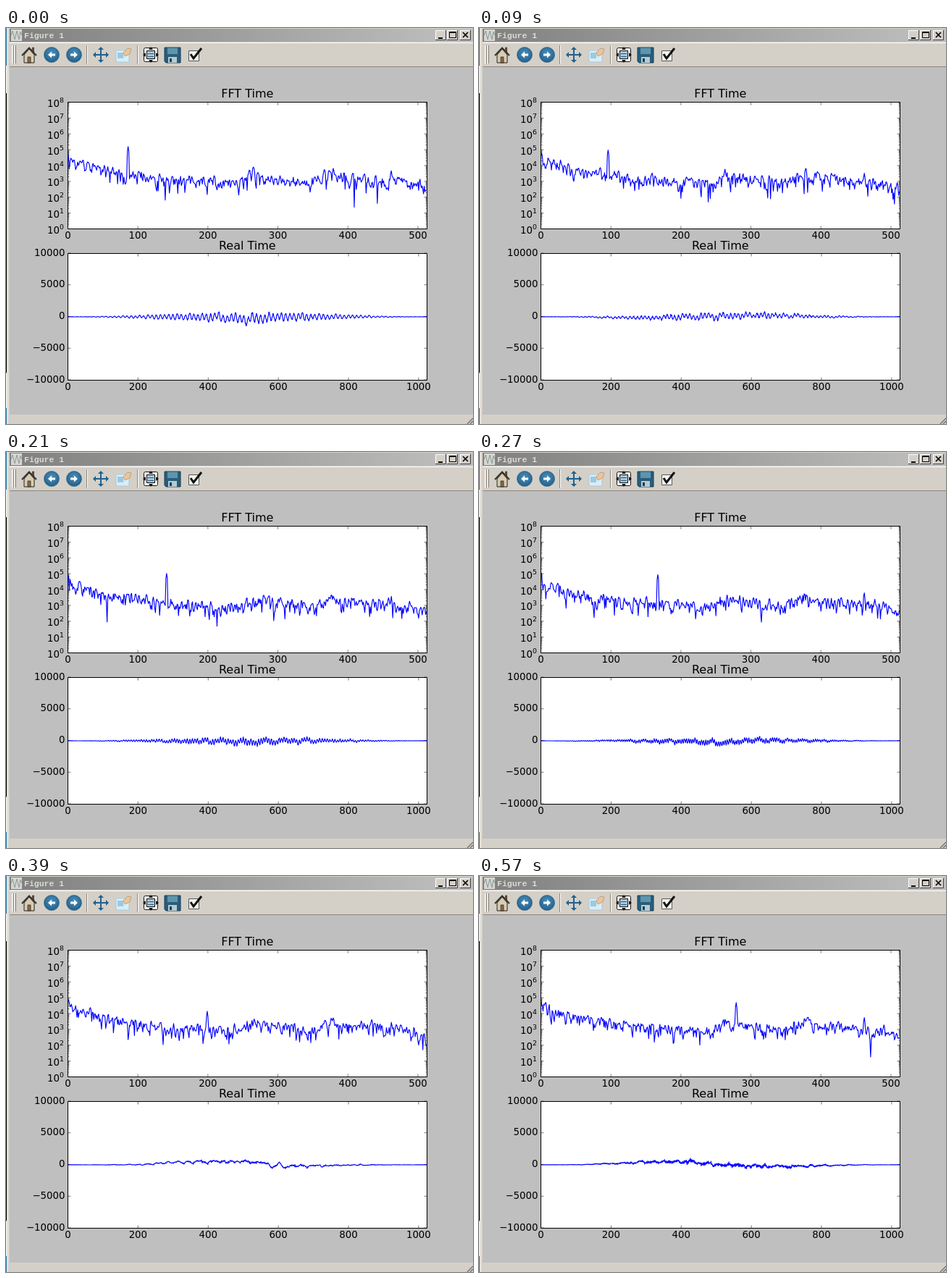
An HTML page that plays this animation: 645x547 px, repeating every 0.6 s.

```html
<!DOCTYPE html>
<html lang="en">
<head>
<meta charset="utf-8">
<title>Figure 1</title>
<style>
  html, body { margin: 0; width: 100%; height: 100%; overflow: hidden; background: #bfbfbf; }
  svg { display: block; width: 645px; height: 547px; }
  .label { font: 13.33px "DejaVu Sans", sans-serif; }
  .exp { font-size: 9.33px; }
  .title { font: 16px "DejaVu Sans", sans-serif; text-anchor: middle; }
  .caption { font: bold 11.5px "Liberation Mono", monospace; fill: #dedad2; }
  .mid { text-anchor: middle; }
  .end { text-anchor: end; }
  .trace { fill: none; stroke: #00f; stroke-width: 1.15; stroke-linejoin: round; }
</style>
</head>
<body>
<svg viewBox="0 0 645 547">
  <defs>
    <linearGradient id="bar"><stop stop-color="#808080"/><stop offset="1" stop-color="#c0c0c0"/></linearGradient>
    <radialGradient id="ball" cy=".4"><stop stop-color="#4b93c2"/><stop offset="1" stop-color="#2b668f"/></radialGradient>
    <clipPath id="spectrumClip"><rect x="85" y="102" width="497" height="176"/></clipPath>
  </defs>

  <!-- window -->
  <rect width="645" height="547" fill="#bfbfbf"/>
  <path d="M0 0H645V54H0ZM0 534H645V547H0ZM0 0H5V547H0Z" fill="#d4d0c8"/>
  <path d="M.5 0V52M.5 525V547" stroke="#2d86bb"/>
  <path d="M.5 52V90M.5 478V525" stroke="#fff"/>
  <path d="M.5 90V476" stroke="#000"/>
  <path d="M2.5 0V547" stroke="#fff" opacity=".7"/>
  <rect x="5" y="1" width="640" height="18" fill="url(#bar)"/>
  <rect x="7" y="2" width="15" height="16" fill="#d6d6d2"/>
  <path d="M7 10L9 4L12 16L15 4L18 16L20 5L22 10" fill="none" stroke="#8a9a94"/>
  <text class="caption" x="25" y="14">Figure 1</text>
  <g id="buttons"></g>
  <path d="M597 14H603" stroke="#000" stroke-width="2"/>
  <path d="M612 6H621V14H612ZM612 7H621" fill="none" stroke="#000" transform="translate(.5 -.5)"/>
  <path d="M631 6L638 13M638 6L631 13" stroke="#000" stroke-width="1.6"/>

  <!-- toolbar -->
  <path d="M5 20.5H645M8.5 24V49M11.5 24V49M112.5 24V50M182.5 24V50" stroke="#fff"/>
  <path d="M5 53.5H645M10.5 24V49M13.5 24V49M111.5 24V50M181.5 24V50" stroke="#8a877f"/>
  <g stroke="#222">
    <path d="M25 37V48H39V37L32 29Z" fill="#d8ccb0"/>
    <path d="M30 48V40H34V48Z" fill="#8b6a48" stroke-width=".7"/>
    <path d="M36.5 27H38.5V33H36.5Z" fill="#8a4a38" stroke-width=".7"/>
    <path d="M22 38L32 27.5L42 38" fill="none" stroke="#333" stroke-width="2"/>
  </g>
  <g fill="url(#ball)" stroke="#2d6288" stroke-width=".7">
    <circle cx="63" cy="37" r="10.5"/><circle cx="94" cy="37" r="10.5"/>
  </g>
  <path d="M58 37L63 32.5V35.5H68V38.5H63V41.5ZM99 37L94 32.5V35.5H89V38.5H94V41.5Z" fill="#fff"/>
  <path d="M131 26L135 30H132V36H138V33L142 37L138 41V38H132V44H135L131 48L127 44H130V38H124V41L120 37L124 33V36H130V30H127Z" fill="#20628f"/>
  <path d="M152 31H170V47H152Z" fill="#d8edf7" stroke="#a9cbdc"/>
  <path d="M154 34H162V42H154Z" fill="#9cc9e2"/>
  <path d="M162 34L168 28L173 29L171 36L164 39Z" fill="#edc39a" stroke="#b58e6b" stroke-width=".7"/>
  <g fill="#fff" stroke="#111">
    <rect x="190.5" y="27.5" width="19" height="19" rx="2"/>
    <rect x="194.5" y="31.5" width="11" height="11" fill="#a9c6d8"/>
    <path d="M200 26L203 30H197ZM200 48L203 44H197ZM189 37L193 34V40ZM211 37L207 34V40Z" fill="#111" stroke="none"/>
    <path d="M196 35.5H204M196 39.5H204" stroke="#285d7c"/>
  </g>
  <path d="M219 27H241V48H221L219 46Z" fill="#285d7c" stroke="#173d55"/>
  <path d="M223 27.5H237V36H223Z" fill="#5f94ad"/>
  <path d="M224 40H236V48H224Z" fill="#b9c9ce"/>
  <path d="M226 42H229V47H226Z" fill="#173d55"/>
  <path d="M252.5 31.5H266.5V45.5H252.5Z" fill="#f4f4f0" stroke="#555"/>
  <path d="M255 36L259 42L270 28" fill="none" stroke="#111" stroke-width="3"/>
  <path d="M645 539L637 547M645 543L641 547" stroke="#777" stroke-width="1.5"/>

  <!-- plots -->
  <path d="M85.5 102.5H581.5V277.5H85.5ZM85.5 311.5H581.5V486.5H85.5Z" fill="#fff"/>
  <path id="ticks" stroke="#000" stroke-width=".55"/>
  <path id="spectrum" class="trace" clip-path="url(#spectrumClip)"/>
  <path id="wave" class="trace"/>
  <path d="M85.5 102.5H581.5V277.5H85.5ZM85.5 311.5H581.5V486.5H85.5Z" fill="none" stroke="#000"/>
  <text class="title" x="333.3" y="96">FFT Time</text>
  <text class="title" x="333.3" y="306">Real Time</text>
  <g id="labels"></g>
</svg>

<script>
const $ = id => document.getElementById(id);
const STEPS = 20, STEP_MS = 30, N = 1024, BINS = 513;
const LEFT = 85.5, RIGHT = 581.5, WIDTH = RIGHT - LEFT;
const DECADE = 175 / 8;
const binX = k => LEFT + k * WIDTH / BINS;
const sampleX = n => LEFT + n * WIDTH / N;
const logY = e => 277.5 - e * DECADE;
const valueY = v => 398.5 - v * 87.5 / 10000;

function drawAxes() {
  let ticks = '', labels = '';
  const text = (cls, x, y, s) => labels += `<text class="label ${cls}" x="${x}" y="${y}">${s}</text>`;
  const sideTicks = (y, len) => ticks += `M${LEFT} ${y}h${len}M${RIGHT} ${y}h${-len}`;
  const endTicks = (x, top, bottom) => ticks += `M${x} ${top}v4M${x} ${bottom}v-4`;
  for (let e = 0; e <= 8; e++) {
    sideTicks(logY(e), 4);
    for (let m = 2; e < 8 && m < 10; m++) sideTicks(logY(e + Math.log10(m)), 2);
    text('end', 74, logY(e) + 6.5, 10);
    text('exp', 74, logY(e) + .5, e);
  }
  for (let k = 0; k <= 500; k += 100) {
    endTicks(binX(k), 102.5, 277.5);
    text('mid', binX(k), 291, k);
  }
  for (let n = 0; n <= 1000; n += 200) {
    endTicks(sampleX(n), 311.5, 486.5);
    text('mid', sampleX(n), 500, n);
  }
  for (let v = -10000; v <= 10000; v += 5000) {
    sideTicks(valueY(v), 4);
    text('end', 81.5, valueY(v) + 3.5, String(v).replace('-', '\u2212'));
  }
  $('ticks').setAttribute('d', ticks);
  $('labels').innerHTML = labels;
  $('buttons').innerHTML = [593, 609, 627].map(x =>
    `<path d="M${x} 3h15v14h-15z" fill="#d4d0c8"/><path d="M${x + .5} 16.5v-13h14" fill="none" stroke="#fff"/>
     <path d="M${x} 16.5h14.5V3" fill="none" stroke="#404040"/>`).join('');
}

// Key poses of the sweep: step, tone bin, log10 of its peak, slow drift in hundreds.
const SWEEP = [
  [0, 86, 5.2, [0, 0, 0, 0, -.5, -3.5, 0, 0, .3, 0, 0]],
  [3, 96, 4.99, [0, 0, -1, -1.5, 0, 1, 2.5, 1.5, 0, 0, 0]],
  [5, 114, 5.08, [0, 0, 0, -.5, 0, -.5, -1, 0, 0, 0, 0]],
  [9, 167, 4.94, [0, -.3, .5, -.5, -.5, -3, 1, .5, 0, 0, 0]],
  [13, 199, 4.15, [0, 0, .3, 4, 5, 5, -2, -1.5, -.3, 0, 0]],
  [16, 279, 4.67, [0, 0, .3, -1.5, 5, 4, 3, -2, 0, 0, 0]],
  [19, 279, 4.69, [0, .2, 2, 4.5, 5, 0, -2, -2.5, -1, 0, 0]],
];
// Noise floor: bin, log10 level.
const FLOOR = [[0, 4.95], [4, 4.3], [25, 4.1], [45, 3.75], [80, 3.5], [130, 3.2], [200, 3], [248, 2.95],
  [260, 3.4], [300, 3.2], [345, 2.95], [376, 3.45], [400, 3.25], [450, 3.1], [490, 2.95], [513, 2.5]];

const mix = (a, b, u) => a + (b - a) * u;
function segment(points, x) {
  let i = 0;
  while (i < points.length - 2 && points[i + 1][0] <= x) i++;
  const a = points[i], b = points[i + 1];
  return [a, b, (x - a[0]) / (b[0] - a[0])];
}
function floorLevel(k) {
  const [a, b, u] = segment(FLOOR, k);
  return mix(a[1], b[1], u);
}
function randomizer(seed) {
  return () => {
    seed = (seed + 0x6D2B79F5) | 0;
    let t = Math.imul(seed ^ seed >>> 15, 1 | seed);
    t = t + Math.imul(t ^ t >>> 7, 61 | t) ^ t;
    return ((t ^ t >>> 14) >>> 0) / 4294967296;
  };
}
const COS = Float64Array.from({ length: N }, (_, i) => Math.cos(2 * Math.PI * i / N));
const polyline = points => 'M' + points.map(([x, y]) => x.toFixed(2) + ' ' + y.toFixed(2)).join('L');

function makeStep(step) {
  const random = randomizer(step * 977 + 41);
  const re = new Float64Array(BINS + 1), im = new Float64Array(BINS + 1);
  const add = (k, size) => {
    const phase = 2 * Math.PI * random();
    re[k] += size * Math.cos(phase);
    im[k] += size * Math.sin(phase);
  };
  for (let k = 0; k < BINS; k++)
    add(k, 10 ** floorLevel(k) * Math.sqrt(-Math.log(1 - random()) / .375));

  const [a, b, u] = segment(SWEEP, step);
  const tone = Math.round(mix(a[1], b[1], u));
  re[tone] = im[tone] = 0;
  add(tone, 2 * 10 ** mix(a[2], b[2], u));
  add(379, 2 * 10 ** 3.65);
  add(462, 2 * 10 ** 3.6);

  // A Hann window blends each bin with its two neighbours.
  const hann = (s, k) => s[k] / 2 - ((k ? s[k - 1] : 0) + s[k + 1]) / 4;
  const spectrum = [];
  for (let k = 0; k < BINS; k++)
    spectrum.push([binX(k), logY(Math.log10(Math.hypot(hann(re, k), hann(im, k)) + 1))]);

  const drift = n => {
    const p = n / N * 10, i = Math.floor(p), ease = (1 - Math.cos(Math.PI * (p - i))) / 2;
    const at = pose => mix(pose[3][i], pose[3][i + 1], ease);
    return 100 * mix(at(a), at(b), u);
  };
  const wave = [];
  for (let n = 0; n < N; n++) {
    let sum = 0;
    for (let k = 16; k < BINS; k++) {
      const i = k * n % N;
      sum += re[k] * COS[i] - im[k] * COS[(i + 768) % N];
    }
    const windowed = (1 - COS[n]) / 2 * sum * 2 / N;
    wave.push([sampleX(n), valueY(windowed + drift(n) - 50)]);
  }
  return { spectrum: polyline(spectrum), wave: polyline(wave) };
}

drawAxes();
const steps = Array.from({ length: STEPS }, (_, i) => makeStep(i));
const start = performance.now();
let shown = -1;
function render(now) {
  const step = Math.floor(Math.max(0, now - start) / STEP_MS) % STEPS;
  if (step !== shown) {
    $('spectrum').setAttribute('d', steps[step].spectrum);
    $('wave').setAttribute('d', steps[step].wave);
    shown = step;
  }
  requestAnimationFrame(render);
}
render(start);
</script>
</body>
</html>
```
